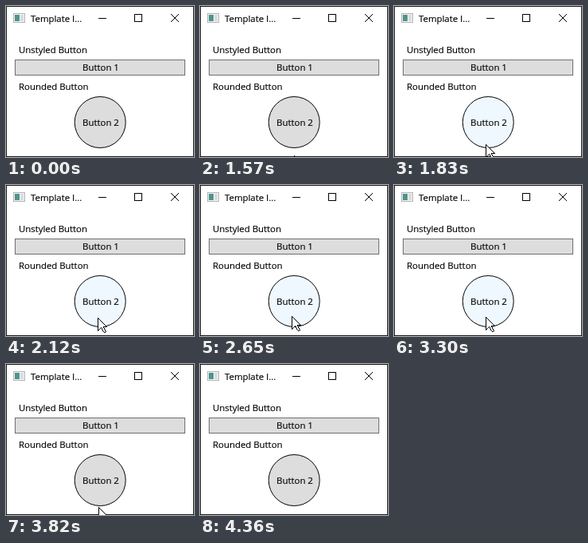
Animation, 236 px wide and 189 px high, one loop 4.88 s. Source, as an HTML page:

```html
<!DOCTYPE html>
<html lang="en">
<head>
<meta charset="utf-8">
<title>Button styles</title>
<style>
  html, body { margin: 0; width: 100%; height: 100%; overflow: hidden; background: #fff; }
  svg { display: block; width: 236px; height: 189px; }
  text { font: 11.4px "Open Sans", "Noto Sans", sans-serif; fill: #000; stroke: #000; stroke-width: .15; }
  .middle { text-anchor: middle; }
  .crisp { shape-rendering: crispEdges; }
  .line { fill: none; stroke: #000; }
</style>
</head>
<body>
<svg viewBox="0 0 236 189">
  <defs>
    <linearGradient id="pane" x2="1" y2="1">
      <stop offset="0" stop-color="#4f8fa0"/>
      <stop offset="1" stop-color="#4a9a78"/>
    </linearGradient>
  </defs>
  <rect width="236" height="189" fill="#fff"/>
  <rect class="line crisp" x=".5" y=".5" width="235" height="188" style="stroke:#1c1c1c"/>

  <g class="crisp">
    <rect x="9.5" y="9.5" width="14" height="11" fill="#f4f4f4" stroke="#b4b4b4"/>
    <rect x="11" y="11" width="6" height="8" fill="url(#pane)"/>
    <rect x="18" y="11" width="4" height="8" fill="#d8dcde"/>
  </g>
  <text x="31" y="20">Template I...</text>
  <path class="line crisp" d="M116 15.5h10M161.5 10.5h9v9h-9z"/>
  <path class="line" d="M207 10l10 10M217 10l-10 10"/>

  <text x="16" y="59">Unstyled Button</text>
  <rect class="crisp" x="11.5" y="67.5" width="213" height="19" fill="#ddd" stroke="#707070"/>
  <text class="middle" x="119" y="81">Button 1</text>
  <text x="16" y="105">Rounded Button</text>
  <circle id="round" cx="118.2" cy="145.5" r="32" fill="#ddd" stroke="#000"/>
  <text class="middle" x="119" y="150">Button 2</text>

  <path id="cursor" class="crisp" fill="#fff" stroke="#000" stroke-linejoin="round"
    d="M.5 .5V16.5L4.5 12.5L7.5 17.5L8.5 18.5H9.5L10.5 17.5L7.5 12.5V11.5H11.5Z"/>
</svg>
<script>
  const LOOP = 4880;
  const BOTTOM = 189;
  const round = document.getElementById('round');
  const cursor = document.getElementById('cursor');

  // A pointer stroke, sampled every `tick` ms; `lean` is its sideways drift.
  const glides = [
    { start: 1570, end: 2120, from: 187, to: 166, tick: 86, power: 1.7, lean: .2 },
    { start: 2650, end: 3300, from: 164, to: 165, tick: 650, power: 1, lean: 0 },
    { start: 3400, end: 3820, from: 165, to: 179, tick: 70, power: 1, lean: .07 },
    { start: 3820, end: 4360, from: 179, to: BOTTOM, tick: 180, power: 1, lean: .07 }
  ];

  function heightAt(time, { start, end, from, to, tick, power }) {
    if (time >= end) return to;
    const sampled = Math.floor((time - start) / tick) * tick;
    const eased = 1 - (1 - sampled / (end - start)) ** power;
    return Math.round(from + (to - from) * eased);
  }

  function draw(time) {
    const glide = glides.findLast(({ start }) => start <= time);
    const y = glide ? heightAt(time, glide) : BOTTOM;
    const x = 115 + Math.ceil(Math.max(0, y - 173) * (glide ? glide.lean : 0));
    const hovered = Math.hypot(x - 118, y - 145) < 32.5;
    cursor.setAttribute('transform', `translate(${x} ${y})`);
    cursor.setAttribute('visibility', y < BOTTOM ? 'visible' : 'hidden');
    round.setAttribute('fill', hovered ? '#f0f8ff' : '#ddd');
  }

  const origin = performance.now();
  function tick() {
    draw((performance.now() - origin) % LOOP);
    requestAnimationFrame(tick);
  }
  tick();
</script>
</body>
</html>
```
